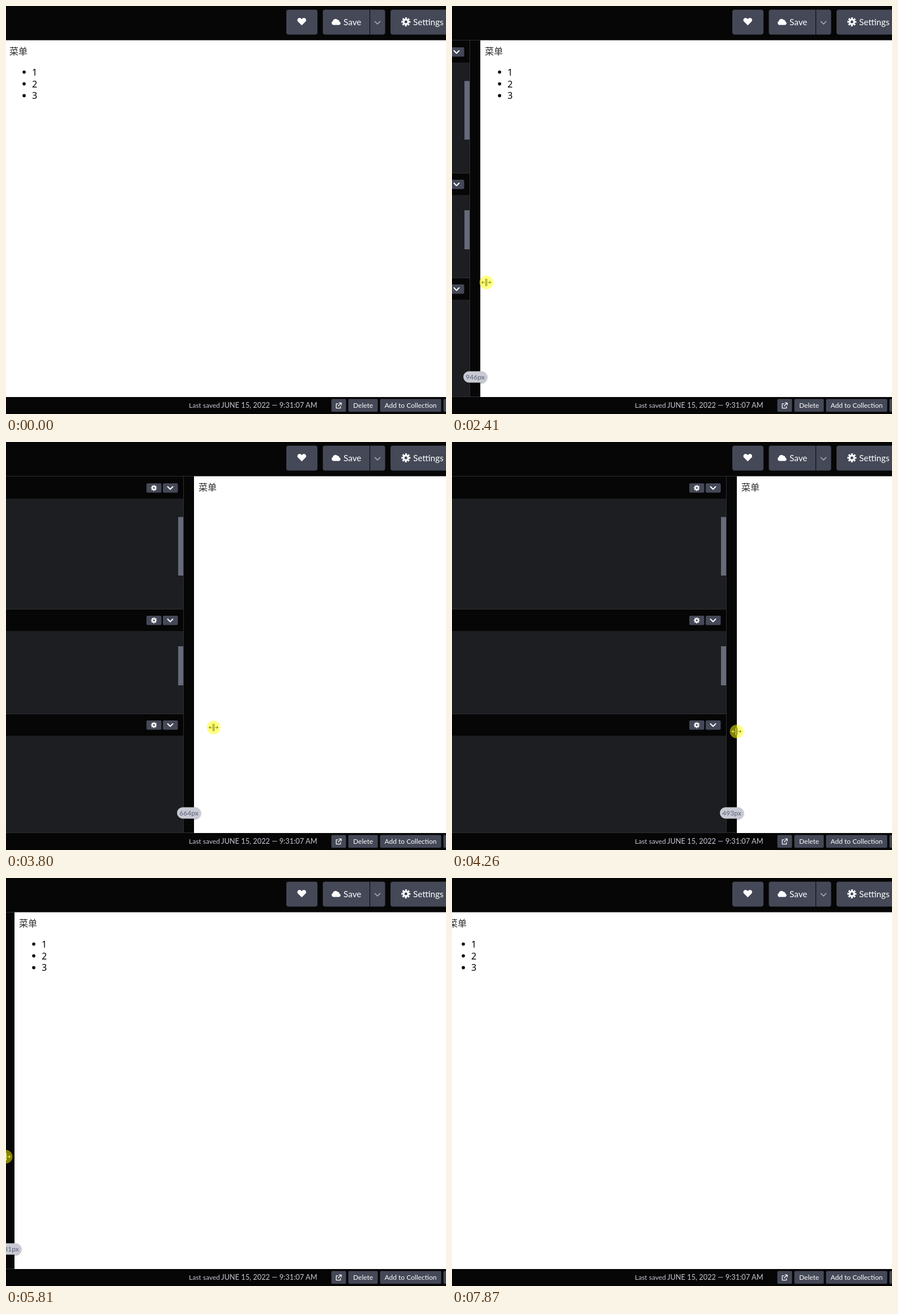
An HTML page for the animation above (8000 ms loop, 777 by 721 pixels).

```html
<!DOCTYPE html>
<html lang="en">
<head>
<meta charset="utf-8">
<title>Resizable editor</title>
<style>
  html, body { margin: 0; width: 100%; height: 100%; overflow: hidden; background: #060606; }
  svg { display: block; position: absolute; left: 0; top: 0; isolation: isolate; }
  text { font-family: Lato, sans-serif; font-size: 12px; fill: #fff; }
  .big { font-size: 15.3px; }
  .info { fill: #c7c9d3; }
  .date { font-size: 12.8px; }
  .page text { font: 16px "Noto Sans", sans-serif; fill: #000; }
  .page .cjk { font-family: "Noto Sans CJK SC", "Noto Sans CJK", sans-serif; font-weight: 300; fill: #2a2a2a; }
  .btn { fill: #444857; }
  .line { fill: #2e2f33; }
  .stroke { fill: none; stroke: #fff; stroke-linecap: round; stroke-linejoin: round; }
  .resize { fill: none; stroke: #fff; mix-blend-mode: difference; }
  #pill text { fill: #5a5f73; text-anchor: middle; }
</style>
</head>
<body>
<svg width="777" height="721" viewBox="0 0 777 721">
  <defs>
    <g id="gear" fill="none" stroke="#fff">
      <circle r="4.1" stroke-width="3.2"/>
      <circle r="6.6" stroke-width="2.8" stroke-dasharray="3 2.18" stroke-dashoffset="1.5"/>
    </g>
    <path id="chevron" class="stroke" d="M-4.5 -2.2L0 2.3L4.5 -2.2"/>
    <filter id="shadow" x="-20%" y="-30%" width="140%" height="170%">
      <feDropShadow dx="0" dy="1" stdDeviation="1" flood-color="#000" flood-opacity=".5"/>
    </filter>
  </defs>
  <rect width="777" height="721" fill="#060606"/>

  <g id="split">
    <rect class="line" x="-800" y="60" width="800" height="1"/>
    <g id="panels"></g>
    <rect class="line" x="-19" y="61" width="1" height="630"/>
    <rect class="line" x="-800" y="690" width="800" height="1"/>
    <g class="page">
      <rect y="60.5" width="900" height="630.5" fill="#fff"/>
      <text class="cjk" x="8" y="86">菜单</text>
      <g id="list"></g>
    </g>
  </g>

  <rect y="691" width="777" height="30" fill="#060606"/>

  <rect class="btn" x="495" y="6.5" width="55" height="44" rx="4"/>
  <path fill="#fff" d="M522.3 34.3L515.6 27.6C512.8 24.4 516.2 19 520.6 21.6L522.3 23.2L524 21.6C528.4 19 531.8 24.4 529 27.6Z"/>
  <path class="btn" d="M642 6.5V50.5H563.5Q559.5 50.5 559.5 46.5V10.5Q559.5 6.5 563.5 6.5Z"/>
  <path class="btn" d="M643 6.5H665.5Q669.5 6.5 669.5 10.5V46.5Q669.5 50.5 665.5 50.5H643Z"/>
  <path fill="#fff" d="M578.3 33.5A3.5 3.5 0 0 1 577.2 26.8A4.7 4.7 0 0 1 585.6 24.6A3.1 3.1 0 0 1 588.6 27.6A3 3 0 0 1 588 33.5Z"/>
  <text class="big" x="596" y="33.5">Save</text>
  <use href="#chevron" x="656" y="29.5" stroke-width="1.7" opacity=".5"/>
  <rect class="btn" x="679" y="6.5" width="120" height="44" rx="4"/>
  <use href="#gear" x="706.2" y="28"/>
  <text class="big" x="719" y="33.5">Settings</text>

  <text class="info" x="323" y="710">Last saved</text>
  <text class="info date" x="380" y="710">JUNE 15, 2022 — 9:31:07 AM</text>
  <g class="btn">
    <rect x="574.5" y="694.5" width="26" height="22.5" rx="2"/>
    <rect x="604.5" y="694.5" width="52" height="22.5" rx="2"/>
    <rect x="660.5" y="694.5" width="108" height="22.5" rx="2"/>
    <rect x="772.5" y="694.5" width="20" height="22.5" rx="2"/>
  </g>
  <path class="stroke" stroke-width="1.3" d="M586 702.8H583.2V710.6H590.6V707.6M588.3 701.4H592V705.2M591.8 701.6L586.6 706.8"/>
  <text x="613" y="710">Delete</text>
  <text x="668.5" y="710">Add to Collection</text>

  <g id="pill">
    <rect x="-21" y="645.5" width="42" height="20" rx="10" fill="#c8c9d3" filter="url(#shadow)"/>
    <text id="width" y="660"></text>
  </g>

  <g id="grip">
    <path class="resize" d="M-1 -6.5V6.5M1 -6.5V6.5M-3 0H-8M-5.5 -2.5L-8 0L-5.5 2.5M3 0H8M5.5 -2.5L8 0L5.5 2.5"/>
    <circle r="12" fill="#ff0" fill-opacity=".5"/>
  </g>
  <path id="arrow" fill="#fff" stroke="#000" d="M.5 .8V15L3.6 12.1L5.8 17.3L7.9 16.4L5.7 11.3H10Z"/>
</svg>
<script>
  const LOOP = 8000, PRESS = 2000, RELEASE = 6300;
  const FULL_WIDTH = 996, BREAKPOINT = 768, HAND_LEAD = 100;
  const $ = id => document.getElementById(id);

  // Monotone cubic curve through [time, value] points, held at both ends.
  function curve(...points) {
    const secant = i => points[i] && points[i + 1]
      ? (points[i + 1][1] - points[i][1]) / (points[i + 1][0] - points[i][0]) : 0;
    const slope = i => {
      const a = secant(i - 1), b = secant(i);
      return a * b > 0 ? 2 * a * b / (a + b) : 0;
    };
    return t => {
      if (t <= points[0][0]) return points[0][1];
      const i = points.findIndex(p => p[0] > t) - 1;
      if (i < 0) return points[points.length - 1][1];
      const [t0, v0] = points[i], [t1, v1] = points[i + 1];
      const d = t1 - t0, u = (t - t0) / d, w = 1 - u;
      return v0 * w * w * (1 + 2 * u) + v1 * u * u * (3 - 2 * u) +
        d * u * w * (slope(i) * w - slope(i + 1) * u);
    };
  }

  const edgeAt = curve([PRESS, -2], [2410, 50], [3170, 230], [3650, 286], [4260, 503],
    [4420, 512], [4970, 102], [5320, 46], [5810, 15], [RELEASE, -14]);

  const arriveX = curve([0, 740], [810, 26], [1090, -14]);
  const arriveY = curve([0, 721], [810, 498], [1090, 484]);
  const leaveX = curve([RELEASE, -24], [7120, 633], [7700, 11], [7870, -14]);
  const leaveY = curve([RELEASE, 500], [7120, 657], [7700, 581], [7870, 578]);

  function pointerAt(t) {
    if (t < PRESS) return [arriveX(t), arriveY(t)];
    if (t >= RELEASE) return [leaveX(t), leaveY(t)];
    // The hand runs ahead of the splitter and sinks a little over time.
    const x = edgeAt(t + HAND_LEAD) - 9;
    return [x, 484 + x * .045 + (t - PRESS) * .002];
  }

  const rect = (x, y, w, h, fill, rx = 0) =>
    `<rect x="${x}" y="${y}" width="${w}" height="${h}" fill="${fill}" rx="${rx}"/>`;

  function panel(top, bottom, barOffset, barHeight) {
    const body = top + 39, button = top + 12, mid = button + 8.2;
    return rect(-800, body, 781, bottom - body, '#1d1e22') +
      rect(-800, bottom, 781, 1, '#2e2f33') +
      rect(-28, top + barOffset, 10, barHeight, '#666b7a') +
      rect(-84, button, 26.5, 16.5, '#444857', 2) +
      rect(-55, button, 26.5, 16.5, '#444857', 2) +
      `<use href="#gear" transform="translate(-70.8 ${mid}) scale(.66)"/>` +
      `<use href="#chevron" x="-42" y="${mid}" stroke-width="2"/>`;
  }

  $('panels').innerHTML =
    panel(61, 295, 71.5, 103.5) + panel(295, 480, 66, 69) + panel(480, 690, 0, 0);

  $('list').innerHTML = [1, 2, 3].map(n =>
    `<circle cx="34" cy="${96 + n * 20.8}" r="2.8"/>` +
    `<text x="48" y="${102 + n * 20.8}">${n}</text>`).join('');

  const show = (node, on) => node.setAttribute('visibility', on ? 'visible' : 'hidden');
  const move = (node, x, y = 0) => node.setAttribute('transform', `translate(${x} ${y})`);

  function draw(t) {
    const edge = Math.round(edgeAt(t));
    const [x, y] = pointerAt(t).map(Math.round);
    const dragging = t >= PRESS && t < RELEASE;
    const width = FULL_WIDTH - edge;

    move($('split'), edge);
    move($('pill'), edge - 9);
    move($('grip'), x + .5, y + .5);
    move($('arrow'), x, y);
    $('width').textContent = width + 'px';
    show($('list'), width > BREAKPOINT);
    show($('pill'), dragging);
    show($('grip'), dragging);
    show($('arrow'), !dragging);
  }

  const start = performance.now();
  function tick() {
    draw((performance.now() - start) % LOOP);
    requestAnimationFrame(tick);
  }
  tick();
</script>
</body>
</html>
```
